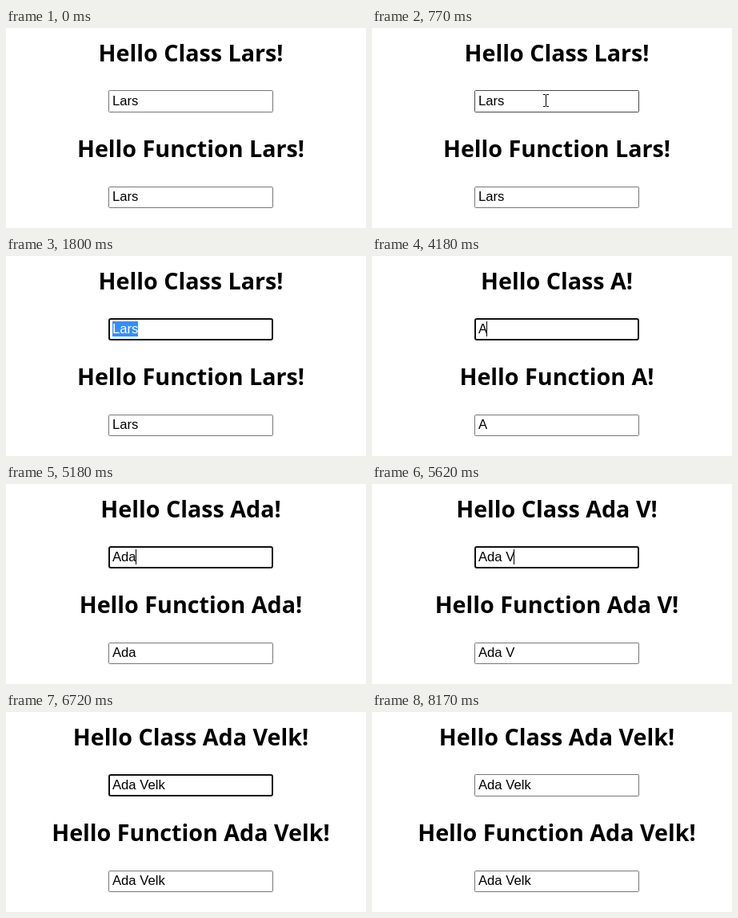
Recreate the animation shown at these times as an HTML page. Size 450 px wide and 251 px high, loop 8.27 s.

```html
<!DOCTYPE html>
<html lang="en">
<head>
<meta charset="utf-8">
<title>Greeting form</title>
<style>
  html, body { margin: 0; width: 100%; height: 100%; overflow: hidden; background: #fff; }
  svg { display: block; width: 450px; height: 251px; }
  text { white-space: pre; }
  .heading { font: 700 28.7px "Noto Sans", "Open Sans", sans-serif; text-anchor: middle; }
  .value { font: 16.67px "Liberation Sans", Arial, sans-serif; }
  .box { fill: #fff; stroke: #767676; }
  .box.hover { stroke: #484848; }
  .box.focus { stroke: #101010; stroke-width: 2; }
  .picked { fill: #fff; }
</style>
</head>
<body>
<svg viewBox="0 0 450 251">
  <text class="heading" id="classHeading" x="231" y="42"></text>
  <rect class="box" id="field"/>
  <rect id="selection" x="133" y="82" height="19" fill="#338fff"/>
  <text class="value" x="133" y="97"><tspan id="plain"></tspan><tspan id="picked" class="picked"></tspan></text>
  <rect id="caret" y="82" width="1" height="19"/>

  <text class="heading" id="functionHeading" x="231" y="162"></text>
  <rect class="box" x="128.5" y="199.5" width="205" height="26" rx="1"/>
  <text class="value" id="mirror" x="133" y="217"></text>

  <path id="arrow" d="M.5 .5V16.5L4.2 13L6.7 18.5L9 17.5L6.6 12H11.5Z" fill="#fff" stroke="#000"/>
  <path id="beam" d="M-3 -7.5H0M1 -7.5H4M-3 7.5H0M1 7.5H4M.5 -7V7" fill="none" stroke="#000"/>
</svg>
<script>
  const LOOP = 8270;
  const FOCUS = 1010, DRAG_END = 1400, EXIT = 1800, BLUR = 8170;
  const FIRST_NAME = 'Lars', TYPED_NAME = 'Ada Velk';
  const KEY_TIMES = [4180, 4950, 5180, 5320, 5620, 5860, 6030, 6170];
  const BLINKS = [[4730, 4950], [6720, 7230], [7780, BLUR]];
  const TEXT_X = 133;

  const moves = [
    { start: 80, end: 300, steps: 7, from: [389, 240], to: [239, 115] },
    { start: 490, end: 770, steps: 10, from: [239, 115], to: [217, 91] },
    { start: FOCUS, end: DRAG_END, steps: 11, from: [217, 91], to: [75, 82] },
    { start: DRAG_END + 40, end: EXIT - 35, steps: 10, from: [75, 82], to: [418, 161] }
  ];
  const fieldArea = [128, 78, 334, 106];
  const headingArea = [89, 132, 373, 172];

  const el = Object.fromEntries([...document.querySelectorAll('[id]')].map(e => [e.id, e]));
  const pen = document.createElement('canvas').getContext('2d');
  pen.font = '16.67px "Liberation Sans", Arial, sans-serif';

  const width = s => pen.measureText(s).width;
  const ease = p => p * p * (3 - 2 * p);
  const inside = ([x, y], [l, t, r, b]) => x >= l && x < r && y >= t && y < b;
  const show = (e, on) => e.setAttribute('visibility', on ? 'visible' : 'hidden');

  function pointerAt(t) {
    if (t < moves[0].start || t >= EXIT) return null;
    const m = moves.filter(move => t >= move.start).pop();
    const p = Math.min(1, (t - m.start) / (m.end - m.start));
    const k = ease(Math.floor(p * (m.steps - 1) + 1e-6) / (m.steps - 1));
    return m.from.map((v, i) => Math.round(v + (m.to[i] - v) * k));
  }

  // Index of the first selected character: the letter boundary nearest the pointer.
  function selectionStart(t, pointer) {
    if (t < FOCUS || t >= KEY_TIMES[0]) return Infinity;
    if (t >= DRAG_END || !pointer) return 0;
    let best = 0, gap = Infinity;
    for (let i = 0; i <= FIRST_NAME.length; i++) {
      const d = Math.abs(TEXT_X + width(FIRST_NAME.slice(0, i)) - pointer[0]);
      if (d < gap) { gap = d; best = i; }
    }
    return best;
  }

  function render(t) {
    const typed = KEY_TIMES.filter(k => t >= k).length;
    const name = typed ? TYPED_NAME.slice(0, typed) : FIRST_NAME;
    const focused = t >= FOCUS && t < BLUR;
    const pointer = pointerAt(t);
    const hovered = pointer && inside(pointer, fieldArea);

    el.classHeading.textContent = `Hello Class ${name}!`;
    el.functionHeading.textContent = `Hello Function ${name}!`;
    el.mirror.textContent = name;

    const start = Math.min(selectionStart(t, pointer), name.length);
    const selecting = start < name.length;
    el.plain.textContent = name.slice(0, start);
    el.picked.textContent = name.slice(start);
    const left = Math.round(TEXT_X + width(name.slice(0, start)));
    el.selection.setAttribute('x', left);
    el.selection.setAttribute('width', Math.round(TEXT_X + width(name)) - left);
    show(el.selection, selecting);

    el.field.setAttribute('class', 'box' + (focused ? ' focus' : hovered ? ' hover' : ''));
    const inset = focused ? 1 : .5;
    const box = { x: 128 + inset, y: 78 + inset, width: 206 - 2 * inset, height: 28 - 2 * inset, rx: focused ? 2 : 1 };
    for (const key in box) el.field.setAttribute(key, box[key]);

    el.caret.setAttribute('x', Math.floor(TEXT_X - .5 + width(name)));
    show(el.caret, focused && !selecting && !BLINKS.some(([a, b]) => t >= a && t < b));

    const dragging = t >= FOCUS && t < DRAG_END;
    const overText = pointer && (dragging || hovered || inside(pointer, headingArea));
    show(el.arrow, pointer && !overText);
    show(el.beam, overText);
    if (pointer) (overText ? el.beam : el.arrow).setAttribute('transform', `translate(${pointer})`);
  }

  const begun = performance.now();
  function tick() {
    render((performance.now() - begun) % LOOP);
    requestAnimationFrame(tick);
  }
  tick();
</script>
</body>
</html>
```
